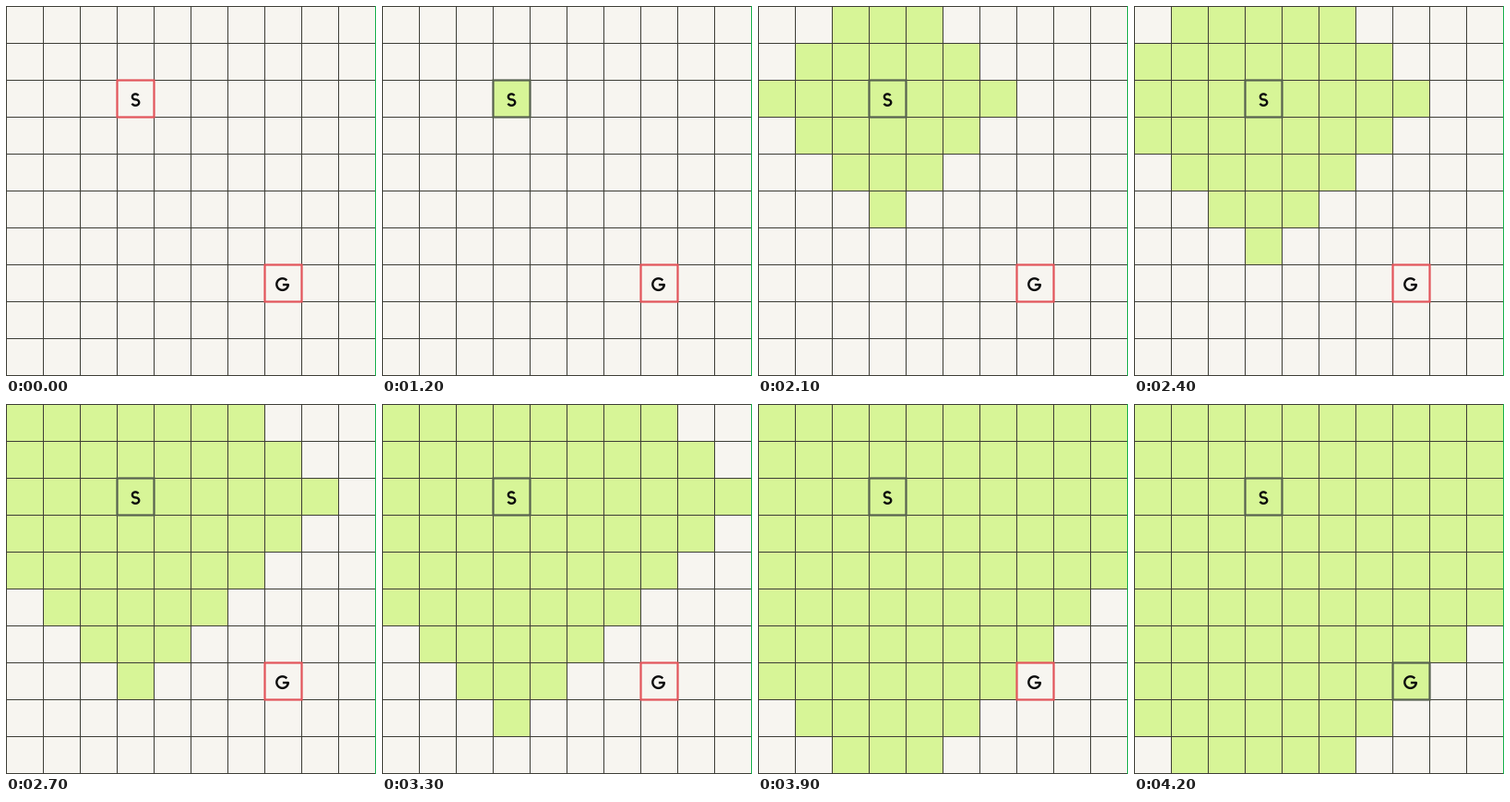
A matplotlib script that plays this animation: 401x401 px, repeating every 4.5 s.

```python
import numpy as np
import matplotlib.pyplot as plt
from matplotlib.animation import FuncAnimation
from matplotlib.patches import PathPatch, Rectangle
from matplotlib.path import Path

SIZE, CELL, N = 401, 40, 10
DPI = 64
PX = 72 / DPI
START, GOAL = (3, 2), (7, 7)
FRAMES, STEP = 15, 300
WAIT, PAUSE = 4, 10  # steps before the search starts, step it rests on
PAPER, LIME = "#f7f5f0", "#d7f597"
INK, EDGE = "#3d3d36", "#14b04a"
RED, GREY = "#e2545a", "#56604e"

fig = plt.figure(figsize=(SIZE / DPI, SIZE / DPI), dpi=DPI, facecolor=PAPER)
ax = fig.add_axes([0, 0, 1, 1])
ax.set_xlim(0, SIZE)
ax.set_ylim(SIZE, 0)
ax.axis("off")


def block(x, y, w, h, color, z):
    return ax.add_patch(Rectangle((x, y), w, h, fc=color, lw=0,
                                  antialiased=False, zorder=z))


def frame_box(cell):
    x, y = cell[0] * CELL + 0.5, cell[1] * CELL + 0.5
    return ax.add_patch(Rectangle((x, y), CELL, CELL, fill=False, ec=RED,
                                  lw=2.2 * PX, snap=False, zorder=4))


def arc(x, y, rx, ry, a0, a1):
    a = np.radians(np.linspace(a0, a1, 40))
    return np.column_stack([x + rx * np.cos(a), y + ry * np.sin(a)])


def stroke(*parts):
    ax.add_patch(PathPatch(Path(np.vstack(parts)), fill=False, ec="#0c0c0c",
                           lw=2.4 * PX, capstyle="butt", joinstyle="round",
                           snap=False, zorder=5))


def letter_s(x, y):
    stroke(arc(x, y - 3.2, 3.4, 3.0, -25, -250),
           arc(x, y + 3.0, 3.9, 3.2, -70, 160))


def letter_g(x, y, r=6.3):
    stroke(arc(x, y, r, r, -42, -356), [(x + 0.3, y + 0.45)])


cells = {(c, r): block(c * CELL, r * CELL, CELL, CELL, LIME, 1)
         for c in range(N) for r in range(N)}
for i in range(N + 1):
    block(0, i * CELL, SIZE, 1, INK, 2)
    block(i * CELL, 0, 1, SIZE, EDGE if i == N else INK, 3)
boxes = {cell: frame_box(cell) for cell in (START, GOAL)}
letter_s(140.3, 101.6)
letter_g(299.6, 301.6)


def distance(cell):
    return abs(cell[0] - START[0]) + abs(cell[1] - START[1])


def update(i):
    radius = i - WAIT - (i >= PAUSE)
    for cell, patch in cells.items():
        patch.set_visible(distance(cell) <= radius)
    for cell, box in boxes.items():
        box.set_edgecolor(GREY if distance(cell) <= radius else RED)
    return list(cells.values()) + list(boxes.values())


anim = FuncAnimation(fig, update, frames=FRAMES, interval=STEP,
                     repeat=True, repeat_delay=0, blit=False)
plt.show()
```
